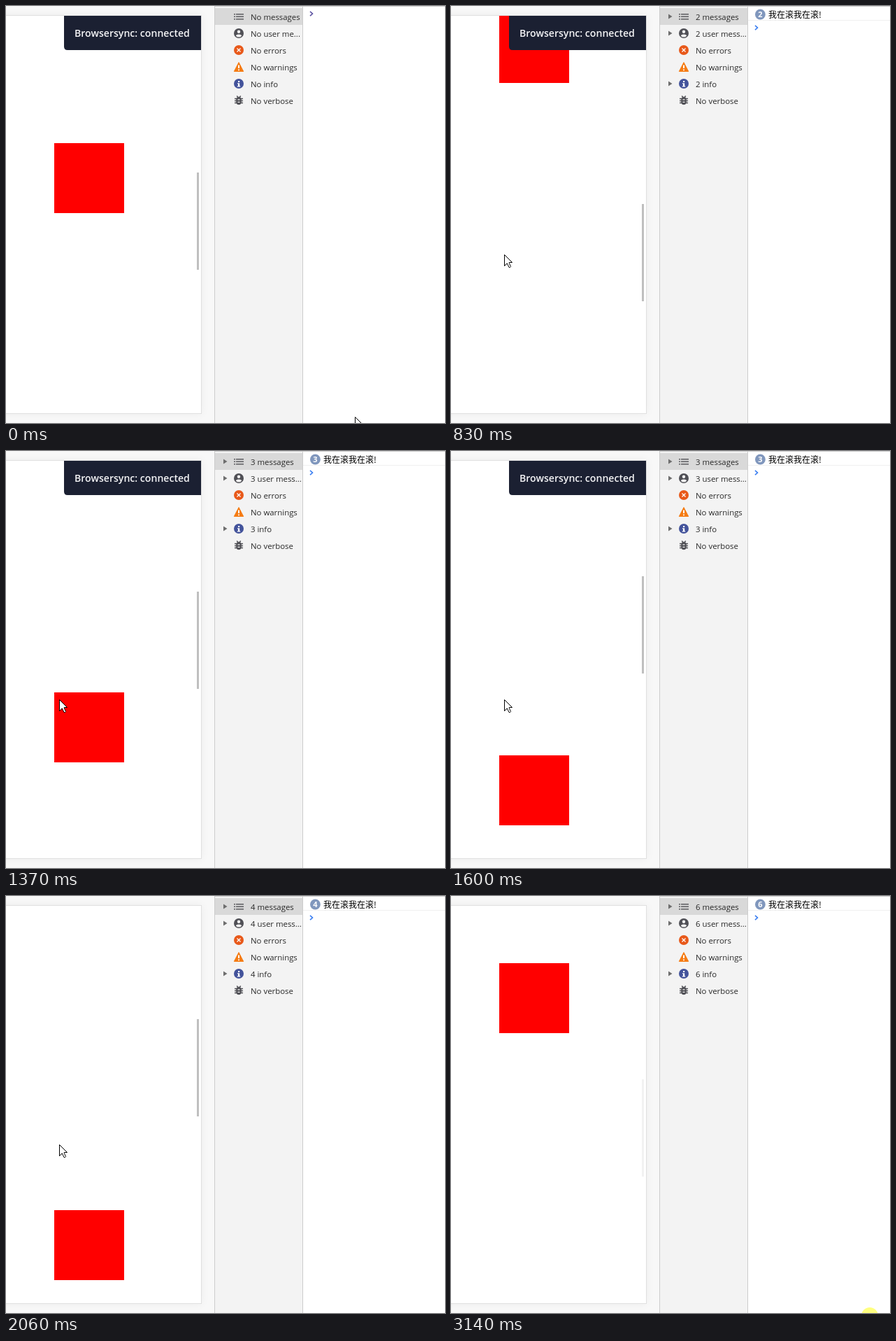
Animation, 628 px wide and 596 px high, one loop 3.29 s. Source, as an HTML page:

```html
<!DOCTYPE html>
<html lang="en">
<head>
<meta charset="utf-8">
<title>Scroll throttling demo</title>
<style>
  html, body { margin: 0; width: 100%; height: 100%; overflow: hidden; background: #fff; }
  svg { display: block; position: absolute; left: 0; top: 0; }
  .page { position: absolute; left: 0; top: 0; width: 298px; height: 596px; background: #f8f8f8; overflow: hidden; }
  .phone { position: absolute; left: -20px; top: 13px; width: 298px; height: 568px; background: #fff;
    border: 1px solid #e0e0e0; box-shadow: 0 0 12px rgba(0, 0, 0, .05); }
  text { font-family: "Open Sans", "Noto Sans", sans-serif; }
  .label { font-size: 11.4px; fill: #282828; }
  .toast { font-size: 14.1px; font-weight: 600; fill: #f4f4f6; }
  .log { font: 12px "Noto Sans CJK SC", "Noto Sans CJK", sans-serif; fill: #000; }
  .count { font-size: 11px; font-weight: 700; fill: #fff; text-anchor: middle; }
</style>
</head>
<body>
<div class="page"><div class="phone"></div></div>
<svg width="628" height="596" viewBox="0 0 628 596">
  <defs>
    <clipPath id="screen"><rect x="0" y="14" width="279" height="568"/></clipPath>
  </defs>

  <g clip-path="url(#screen)">
    <rect id="box" x="69" width="100" height="100" fill="#f00"/>
    <rect id="bar" x="273" width="3" height="139" fill="#bfbfbf"/>
    <g id="toast">
      <path d="M83 14H279V63H88Q83 63 83 58Z" fill="#1b2032"/>
      <text class="toast" x="98" y="44">Browsersync: connected</text>
    </g>
  </g>

  <rect x="298" width="127" height="596" fill="#f3f3f3"/>
  <rect x="299" y="3" width="125" height="24" fill="#d9d9d9"/>
  <path d="M298 .5H628M298.5 0V596M424.5 0V596" stroke="#ccc" fill="none"/>

  <g fill="#505056">
    <path d="M326 11.8h14M326 15.3h14M326 18.8h14" stroke="#5c5c60" stroke-width="1.6" stroke-dasharray="2 1 11"/>
    <circle cx="333" cy="39" r="7"/>
    <circle cx="333" cy="36.7" r="2.2" fill="#f3f3f3"/>
    <path d="M328.8 42.4Q329.5 40.4 333 40.4T337.2 42.4Q335.5 44.6 333 44.6T328.8 42.4Z" fill="#f3f3f3"/>
  </g>
  <circle cx="333" cy="63" r="7" fill="#e8591a"/>
  <path d="M330.5 60.5l5 5m0-5l-5 5" stroke="#fff" stroke-width="1.3"/>
  <path d="M333 80.6L339.7 93.5H326.3Z" fill="#f57c14" stroke="#f57c14" stroke-linejoin="round"/>
  <path d="M333 84.5v4.6m0 1.4v1.8" stroke="#fff" stroke-width="1.9"/>
  <circle cx="333" cy="111" r="7" fill="#43539b"/>
  <path d="M332 107h2.2v2H332zm-1 3.2h3.2v4h1v1.3h-4.4v-1.3h1.2v-2.7h-1z" fill="#fff"/>
  <g stroke="#505056" fill="#505056">
    <path d="M327 132.5h12M327 135.5h12M327 138.5h12M330.2 128.5l1.8 2m3.8-2l-1.8 2" fill="none" stroke-width="1.5"/>
    <rect x="329.8" y="130.3" width="6.4" height="10.4" rx="3"/>
    <path d="M331.5 133.8h3m-3 3.5h3" stroke="#f3f3f3" stroke-width="1.3"/>
  </g>

  <path id="arrows" d="M311 11.5l5.5 3.5-5.5 3.5zm0 24l5.5 3.5-5.5 3.5zm0 72l5.5 3.5-5.5 3.5z" fill="#6e6e6e"/>
  <g id="labels"></g>

  <g id="message">
    <path d="M425 20.5H628" stroke="#f0f0f0"/>
    <g id="badge">
      <circle cx="442.4" cy="12" r="7.4" fill="#8097bd"/>
      <text class="count" id="count" x="442.4" y="16"></text>
    </g>
    <text class="log" id="log" y="16.5">我在滚我在滚!</text>
  </g>
  <path id="prompt" d="M435 7.9l3.5 3.1-3.5 3.1" fill="none" stroke-width="1.6"/>

  <circle id="click" cx="599" cy="600" r="12" fill="#ffff80"/>
  <path id="cursor" d="M.5 .5V16.5L4.3 12.8L7 18.5H8.6L9.5 17.5L7.2 12.3V11.5H11.5Z" fill="#fff" stroke="#000"/>
</svg>
<script>
const LOOP = 3290, LAST = 3140;
const STEP = 540 / 7, OFFSET = 54;
const FIRST_LOG = 290, THROTTLE = 500;

// [time, top of the red box]
const SCROLL = [[230, 196], [550, 505], [830, 10], [1140, 254], [1600, 435], [2060, 449], [2530, 276], [2680, 96]];
// [time, x, y]
const POINTER = [[0, 499, 587], [300, 76, 355], [2450, 76, 355], [2530, 92, 360], [2680, 533, 500], [2780, 599, 600]];

const $ = id => document.getElementById(id);
const set = (id, name, value) => $(id).setAttribute(name, value);
const show = (id, on) => set(id, "visibility", on ? "inherit" : "hidden");
const clamp = (v, low, high) => Math.min(high, Math.max(low, v));

// The picture only changes on a steady beat, rounded up to 10 ms.
function snap(time) {
  const beat = OFFSET + STEP * Math.floor((time - OFFSET) / STEP);
  return clamp(Math.ceil(beat / 10) * 10, 0, LAST);
}

function sample(keys, t) {
  const next = clamp(keys.findIndex(k => k[0] > t), -1, keys.length);
  if (next < 1) return keys.at(next).slice(1);
  const a = keys[next - 1], b = keys[next];
  const part = (t - a[0]) / (b[0] - a[0]);
  return a.slice(1).map((v, i) => Math.round(v + (b[i + 1] - v) * part));
}

const labels = Array.from({ length: 6 }, (_, row) => {
  const text = document.createElementNS("http://www.w3.org/2000/svg", "text");
  text.setAttribute("class", "label");
  text.setAttribute("x", 350);
  text.setAttribute("y", 20 + 24 * row);
  return $("labels").appendChild(text);
});

function drawConsole(n) {
  const amount = n || "No";
  const names = [`${amount} message${n === 1 ? "" : "s"}`, n ? `${n} user mess...` : "No user me...",
    "No errors", "No warnings", `${amount} info`, "No verbose"];
  labels.forEach((label, i) => label.textContent = names[i]);
  show("arrows", n > 0);
  show("message", n > 0);
  show("badge", n > 1);
  $("count").textContent = n;
  set("log", "x", n > 1 ? 454 : 449);
  set("prompt", "transform", `translate(0 ${n ? 20 : 0})`);
  set("prompt", "stroke", n ? "#367cf1" : "#5a50a0");
}

function draw(time) {
  const t = snap(time);
  const [top] = sample(SCROLL, t);
  const [x, y] = sample(POINTER, t);
  set("box", "y", top);
  set("bar", "y", Math.round(285.9 - .245 * top));
  set("bar", "opacity", clamp((3180 - t) / 200, 0, 1));
  set("cursor", "transform", `translate(${x} ${y})`);
  show("toast", t < 1840);
  show("click", t >= LAST);
  drawConsole(Math.max(0, 1 + Math.floor((t - FIRST_LOG) / THROTTLE)));
}

const start = performance.now();
function loop() {
  draw((performance.now() - start) % LOOP);
  requestAnimationFrame(loop);
}
loop();
</script>
</body>
</html>
```
